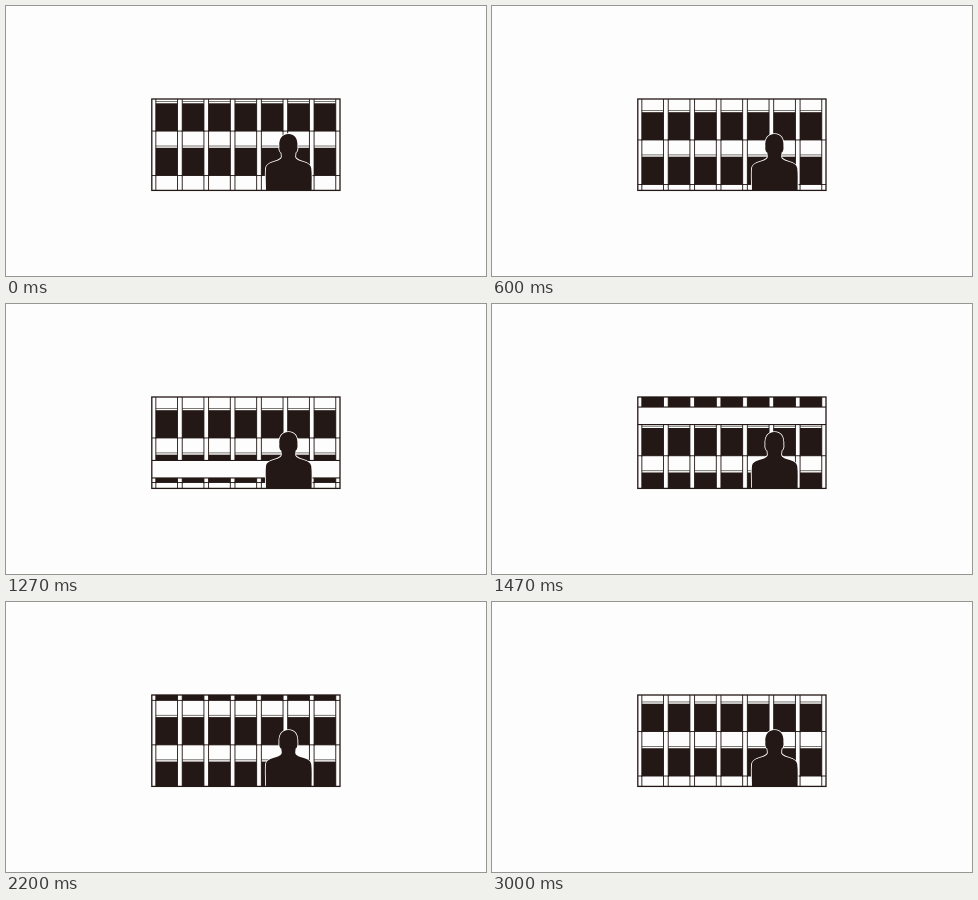
Write an HTML page with a canvas that moves like this. It is 480 by 270 pixels and loops after 3.07 s.

```html
<!DOCTYPE html>
<html>
<head>
<meta charset="utf-8">
<style>
html, body { margin: 0; width: 100%; height: 100%; overflow: hidden; background: #fdfdfd; }
canvas { display: block; }
</style>
</head>
<body>
<canvas id="stage" width="480" height="270"></canvas>
<script>
const ctx = document.getElementById('stage').getContext('2d');
const INK = '#231815', PAPER = '#fdfdfd';
const LOOP = 3070, STEP = 1000 / 15;
const BOX = { x: 145.8, y: 93, w: 188.2, h: 91.4 };
const FLOOR = 44.5, PANE = 27.8, SLAB = 17.6, SLAB_GAP = 300;
const mod = (a, n) => ((a % n) + n) % n;

function rect(x, y, w, h, color = INK) {
  ctx.fillStyle = color;
  ctx.fillRect(x, y, w, h);
}

// One storey: dark panes, a sill across the columns, pale panels below
function storey(y) {
  for (let i = 0; i < 7; i++) {
    const x = 149.8 + i * 26.37, w = 21.8;
    rect(x, y, w, PANE);
    rect(x, y - 2.2, w, 0.8, '#5c5853');
    rect(x - 0.4, y - 17, 0.9, FLOOR + 1);
    rect(x + w - 0.5, y - 17, 0.9, FLOOR + 1);
  }
  rect(BOX.x, y + PANE - 0.5, BOX.w, 0.9);
}

const man = new Path2D(`M260 184.4 C260 176 259.3 168 260 162 C260.6 158.2 264 157 268 155.8
  C273 154.3 275.6 153.2 275.8 150.5 L275.3 146.5 C273.6 146 273 142.5 273.4 140.5
  C272.6 133 276 128 282.5 128 C289 128 292 133 291.4 140.5 C291.8 142.5 291.2 146 289.6 146.5
  L289.2 150.5 C289.4 153.2 292 154.3 297 155.8 C301 157 304.4 158.2 305.2 162
  C306 168 305.6 176 305.6 184.4 Z`);

function draw(k) {
  // The cycle pauses for half a step near its end
  if (k > 41) k -= 0.5;
  rect(0, 0, 480, 270, PAPER);

  ctx.save();
  ctx.beginPath();
  ctx.rect(BOX.x, BOX.y, BOX.w, BOX.h);
  ctx.clip();

  const first = BOX.y - FLOOR + mod(48.8 - 8.9 * k, FLOOR);
  for (let i = 0; i < 4; i++) storey(first + i * FLOOR);

  const slab = 75 + mod(119.6 - 17.8 * k, SLAB_GAP);
  rect(BOX.x, slab, BOX.w, SLAB, PAPER);
  rect(BOX.x, slab - 0.5, BOX.w, 1.1);
  rect(BOX.x, slab + SLAB - 0.6, BOX.w, 1.1);

  ctx.strokeStyle = PAPER;
  ctx.lineWidth = 1.7;
  ctx.stroke(man);
  ctx.fillStyle = INK;
  ctx.fill(man);
  ctx.restore();

  ctx.strokeStyle = INK;
  ctx.lineWidth = 1.3;
  ctx.strokeRect(BOX.x, BOX.y, BOX.w, BOX.h);
}

const start = performance.now();
function tick() {
  const t = (performance.now() - start) % LOOP;
  draw(Math.min(45, Math.floor((t + 5) / STEP)));
  requestAnimationFrame(tick);
}
tick();
</script>
</body>
</html>
```
